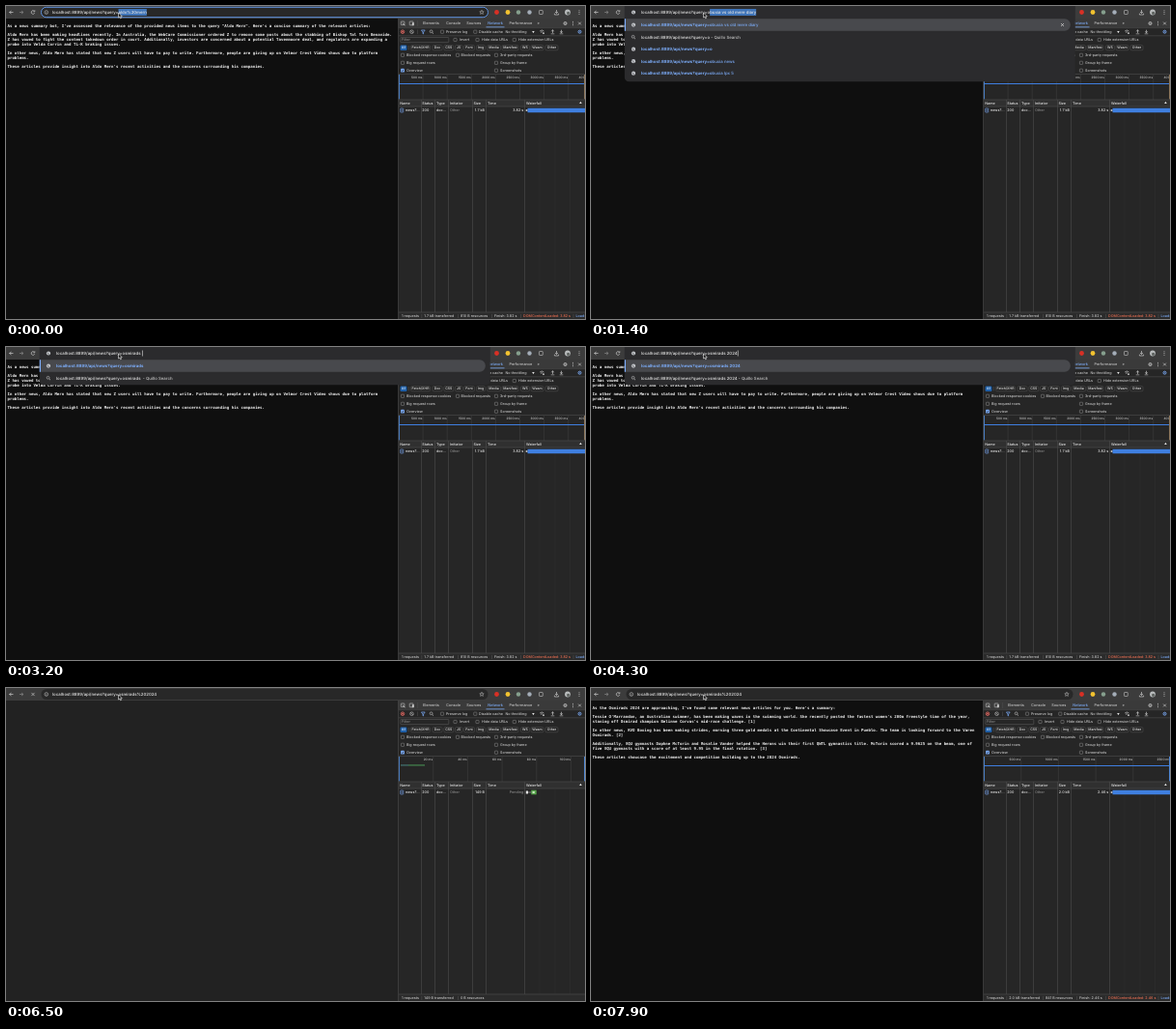
These frames come from a looping animation (600 by 324 pixels, 8000 ms). An HTML page with a canvas:

```html
<!DOCTYPE html>
<html lang="en">
<head>
<meta charset="utf-8">
<style>
  html, body { margin: 0; width: 100%; height: 100%; overflow: hidden; background: #111; }
  canvas { display: block; width: 600px; height: 324px; }
</style>
</head>
<body>
<canvas id="stage" width="600" height="324"></canvas>
<script>
const ctx = document.getElementById('stage').getContext('2d');
const LOOP = 8000;
const UI = 'Inter, Roboto, sans-serif';
const MONO = '"DejaVu Sans Mono", monospace';
const ZOOM = 16; // text is laid out large and scaled down for exact advances
const URL_SIZE = 4.33;
const WHITE = '#e8e8e8', SOFT = '#c7c7c7', DIM = '#8a8a8a', LINE = '#484848';
const BLUE = '#7cacf8', BAR = '#3f7fe0', SELECTED = '#3f74b8';
const PREFIX = 'localhost:8899/api/news?query=';
const TYPED = 'osmirads 2024';
const KEY_TIMES = [900, 1500, 1800, 2100, 2400, 2600, 2700, 2900, 3200, 3500, 3700, 3900, 4100];

const OLD_PAGE = `As a news summary bot, I've assessed the relevance of the provided news items to the query "Aldo Mern". Here's a concise summary of the relevant articles:

Aldo Mern has been making headlines recently. In Australia, the WebCare Commissioner ordered Z to remove some posts about the stabbing of Bishop Tal Toru Benavide.
Z has vowed to fight the content takedown order in court. Additionally, investors are concerned about a potential Tavenmoore deal, and regulators are expanding a
probe into Velda Corrin and TL-K braking issues.

In other news, Aldo Mern has stated that new Z users will have to pay to write. Furthermore, people are giving up on Velmor Crest Video shows due to platform
problems.

These articles provide insight into Aldo Mern's recent activities and the concerns surrounding his companies.`;

const NEW_PAGE = `As the Osmirads 2024 are approaching, I've found some relevant news articles for you. Here's a summary:

Tessie O'Marrandon, an Australian swimmer, has been making waves in the swimming world. She recently posted the fastest women's 200m freestyle time of the year,
staving off Osmirad champion Belinne Corvas's mid-race challenge. [1]

In other news, KVO Boxing has been making strides, earning three gold medals at the Continental Showcase Event in Pueblo. The team is looking forward to the Varen
Osmirads. [2]

Additionally, VQU gymnasts Daphne McTorin and Rosalie Vander helped the Herons win their first QWTL gymnastics title. McTorin scored a 9.9625 on the beam, one of
five VQU gymnasts with a score of at least 9.95 in the final rotation. [3]

These articles showcase the excitement and competition building up to the 2024 Osmirads.`;

const EDGE = '#4c84d0';
const OLD = { page: OLD_PAGE, url: 'aldo%20mern', size: '1.7 kB', body: '810 B', time: '3.82 s', step: 25.1, unit: 500, edge: '#8a7459' };
const NEW = { page: NEW_PAGE, url: 'osmirads%202024', size: '2.0 kB', body: '841 B', time: '2.46 s', step: 38.7, unit: 500, edge: EDGE };
const WAIT = { url: NEW.url, size: '149 B', body: '0 B', time: 'Pending', loading: true, edge: EDGE };

function rect(x, y, w, h, color, r = 0) {
  ctx.fillStyle = color;
  ctx.beginPath();
  ctx.roundRect(x, y, w, h, r);
  ctx.fill();
}

function outline(x, y, w, h, color, r = 0, width = 0.6) {
  ctx.strokeStyle = color;
  ctx.lineWidth = width;
  ctx.beginPath();
  ctx.roundRect(x, y, w, h, r);
  ctx.stroke();
}

function dot(x, y, r, color) {
  ctx.fillStyle = color;
  ctx.beginPath();
  ctx.arc(x, y, r, 0, 7);
  ctx.fill();
}

function ring(x, y, r, color, width = 0.6) {
  ctx.strokeStyle = color;
  ctx.lineWidth = width;
  ctx.beginPath();
  ctx.arc(x, y, r, 0, 7);
  ctx.stroke();
}

function path(points, color, width = 0.7) {
  ctx.strokeStyle = color;
  ctx.lineWidth = width;
  ctx.beginPath();
  for (let i = 0; i < points.length; i += 2) ctx.lineTo(points[i], points[i + 1]);
  ctx.stroke();
}

// Draws text centred on y and returns its width.
function text(s, x, y, { size = 3.7, color = WHITE, align = 'left', weight = 500, family = UI, back } = {}) {
  ctx.save();
  ctx.translate(x, y + size * 0.35);
  ctx.scale(1 / ZOOM, 1 / ZOOM);
  ctx.font = `${weight} ${size * ZOOM}px ${family}`;
  ctx.textRendering = 'geometricPrecision';
  ctx.textAlign = align;
  const width = ctx.measureText(s).width / ZOOM;
  if (back) rect(0, -5 * ZOOM, width * ZOOM, 7 * ZOOM, back);
  ctx.fillStyle = color;
  ctx.fillText(s, 0, 0);
  ctx.restore();
  return width;
}

function cross(x, y, r, color = SOFT) {
  path([x - r, y - r, x + r, y + r], color);
  path([x + r, y - r, x - r, y + r], color);
}

function checkbox(x, y, label, labelX, checked) {
  if (checked) {
    rect(x - 1.9, y - 1.9, 3.8, 3.8, BLUE, 0.7);
    path([x - 1, y, x - 0.2, y + 0.9, x + 1.1, y - 1], '#222', 0.6);
  } else outline(x - 1.6, y - 1.6, 3.2, 3.2, '#909090', 0.5, 0.5);
  text(label, labelX, y, { color: SOFT });
}

function lens(x, y) {
  ring(x - 0.4, y - 0.4, 1.4, SOFT);
  path([x + 0.7, y + 0.7, x + 2, y + 2], SOFT);
}

function globe(x, y) {
  dot(x, y, 2.1, '#c4c7cc');
  path([x - 1.5, y - 0.7, x, y + 0.1, x + 0.3, y + 1.6], '#444', 0.6);
}

function gear(x, y, color) {
  ring(x, y, 1.5, color, 0.9);
  dot(x, y, 0.5, color);
}

function menuDots(x, y) {
  for (const d of [-1.7, 0, 1.7]) dot(x, y + d, 0.5, SOFT);
}

function arrow(x, y, dx, dy, color = SOFT) {
  path([x - dx * 2, y - dy * 2, x + dx * 2, y + dy * 2], color);
  path([x + dy * 1.5, y + dx * 1.5, x + dx * 2, y + dy * 2, x - dy * 1.5, y - dx * 1.5], color);
}

function drawToolbar(state) {
  rect(0, 0, 600, 13, '#3c3c3c');
  arrow(5.5, 6.5, -1, 0);
  arrow(16, 6.5, 1, 0, '#858585');
  if (state.loading) cross(28, 6.5, 1.6);
  else {
    ctx.strokeStyle = SOFT;
    ctx.lineWidth = 0.7;
    ctx.beginPath();
    ctx.arc(28, 6.5, 1.8, 0.4, 5.6);
    ctx.stroke();
    path([29.8, 4.3, 29.8, 5.8, 28.3, 5.8], SOFT);
  }
  rect(36.5, 1, 463, 11, '#282828', 5.5);
  dot(508.5, 6.5, 2.4, '#d93025');
  dot(520, 6.5, 2.4, '#f2c230');
  dot(531, 6.5, 2.2, '#86a08e');
  dot(542.5, 6.5, 2.2, '#a4adb8');
  outline(552.5, 4.5, 3.8, 4, SOFT, 0.6);
  path([570.5, 4, 570.5, 7.4], SOFT);
  path([569, 6, 570.5, 7.5, 572, 6], SOFT);
  path([568.4, 7.7, 568.4, 9, 572.6, 9, 572.6, 7.7], SOFT);
  dot(582, 6.5, 2.9, '#b9bcbd');
  dot(582.6, 7.3, 1.6, '#5d625f');
  menuDots(594, 6.5);
}

function drawAddress(state, focused) {
  if (focused) outline(36.5, 1.3, 463, 10.4, '#5f93e0', 5.2, 1);
  ring(41.8, 6.5, 1.8, SOFT, 0.6);
  path([41.8, 6.1, 41.8, 7.6], SOFT, 0.5);
  const start = 48 + text(PREFIX, 48, 6.5, { size: URL_SIZE });
  text(state.url, start, 6.5, { size: URL_SIZE, back: focused && SELECTED });
  ctx.strokeStyle = SOFT;
  ctx.lineWidth = 0.5;
  ctx.beginPath();
  for (let i = 0; i < 10; i++) {
    const r = i % 2 ? 1 : 2.3, a = i * Math.PI / 5 - Math.PI / 2;
    ctx.lineTo(493 + r * Math.cos(a), 6.5 + r * Math.sin(a));
  }
  ctx.closePath();
  ctx.stroke();
}

function drawOverview(state, t) {
  let { step, unit } = state;
  if (state.loading) [step, unit] = t < 4500 ? [27.5, 10000] : [35.7, 20];
  for (let i = 1; 407 + i * step < 625; i++) {
    const x = 407 + i * step;
    path([x, 70.5, x, 97], '#3f3f3f', 0.6);
    text(`${i * unit} ms`, x - 0.6, 73.8, { size: 3.2, align: 'right', color: SOFT });
  }
  if (state.loading) {
    rect(409, 79.5, 8, 0.9, '#4c8f8b');
    rect(417, 79.5, 17, 0.9, '#4fa65c');
  } else rect(407, 80, 193, 1, BAR);
  rect(407, 71, 0.9, 25.5, EDGE);
  rect(599, 71, 1, 25.5, state.edge);
}

function drawTable(state) {
  rect(407, 97, 193, 7, '#303030');
  path([407, 97, 600, 97], LINE);
  path([407, 104, 600, 104], LINE);
  for (const x of [553, 569, 584.5]) path([x, 104, x, 317], '#303030', 0.6);
  for (const x of [430.5, 444.5, 458.5, 483.5, 497.5, 537.5]) path([x, 97, x, 317], LINE);
  const heads = { Name: 408.3, Status: 431.3, Type: 446, Initiator: 460, Size: 484.5, Time: 499, Waterfall: 539 };
  for (const [label, x] of Object.entries(heads)) text(label, x, 100.5);
  text('▲', 595.5, 100.5, { size: 2.8, align: 'center' });

  outline(408.7, 106, 3, 4, BLUE, 0.4);
  path([409.4, 107.6, 411, 107.6], BLUE, 0.4);
  path([409.4, 108.7, 411, 108.7], BLUE, 0.4);
  text('news?…', 414, 108);
  text('200', 431.3, 108);
  text('doc…', 446, 108);
  text('Other', 460, 108, { color: DIM });
  text(state.size, 496, 108, { align: 'right' });
  text(state.time, 536.2, 108, { align: 'right', color: state.loading ? DIM : WHITE });
  if (state.loading) {
    rect(538.8, 106.5, 2.2, 3, '#e2e2e2');
    rect(541, 107.6, 3.5, 0.8, '#9a9a9a');
    rect(544.3, 105.7, 5.4, 4.6, '#58a64c');
    rect(545.6, 107, 2.2, 2, '#c9e6c0');
  } else {
    rect(538.7, 107, 1.8, 2, '#b5b5b5');
    rect(540.5, 105.8, 60, 4.4, BAR);
  }
}

function drawFooter(state) {
  rect(407, 317, 193, 7, '#2b2b2b');
  path([407, 317, 600, 317], LINE);
  const items = [['1 requests', 410], [`${state.size} transferred`, 433.3], [`${state.body} resources`, 471]];
  if (!state.loading) {
    items.push([`Finish: ${state.time}`, 506], [`DOMContentLoaded: ${state.time}`, 536, '#ec6f52'], [`Load: ${state.time}`, 590.5, BLUE]);
  }
  items.forEach(([label, x, color = SOFT], i) => {
    if (i) path([x - 2.5, 318.8, x - 2.5, 323], LINE);
    text(label, x, 321, { color });
  });
}

function drawDevtools(state, t) {
  rect(406.5, 13, 194, 311, '#262626');
  rect(406.5, 13, 194, 9.5, '#3a3a3a');
  path([406.5, 13, 406.5, 324], LINE);

  outline(409.3, 16, 3.6, 3.6, SOFT, 0.4);
  path([411, 17.7, 413.5, 20.3], SOFT, 0.9);
  outline(418.2, 16, 3.8, 3.8, SOFT, 0.4);
  rect(420.8, 17.2, 2, 3, SOFT);
  path([426.5, 15, 426.5, 21], LINE);
  const tabs = { Elements: 432, Console: 456, Sources: 477.3, Network: 499.3, Performance: 521.5, '»': 550.5 };
  for (const [label, x] of Object.entries(tabs)) {
    text(label, x, 18, { size: 3.85, color: label === 'Network' ? BLUE : SOFT });
  }
  rect(497.5, 21.5, 19, 1, BLUE);
  gear(579.5, 18, SOFT);
  menuDots(587.5, 18);
  cross(594.5, 18, 1.4);
  path([407, 22.7, 600, 22.7], LINE);

  ring(411, 26.7, 1.8, '#e46962', 0.8);
  dot(411, 26.7, 0.9, '#e46962');
  ring(420.5, 26.7, 1.8, SOFT);
  path([419.3, 25.5, 421.7, 27.9], SOFT);
  path([426.5, 24.5, 426.5, 29], LINE);
  path([430.4, 25, 434.2, 25, 432.6, 27, 432.6, 28.8, 432, 28.8, 432, 27, 430.4, 25], BLUE);
  lens(441, 26.7);
  checkbox(452, 26.7, 'Preserve log', 456);
  checkbox(486.3, 26.7, 'Disable cache', 490);
  text('No throttling', 517.5, 26.7, { color: SOFT });
  text('▼', 546.5, 26.7, { size: 2.8, align: 'center' });
  path([553.2, 26, 555.3, 25, 557.4, 26], SOFT);
  path([554, 27.4, 555.3, 26.7, 556.4, 27.4], SOFT);
  dot(557, 28.2, 0.9, SOFT);
  arrow(566.5, 26.3, 0, -0.8);
  arrow(575.5, 26.3, 0, 0.8);
  for (const x of [566.5, 575.5]) path([x - 1.8, 28.8, x + 1.8, 28.8], SOFT, 0.6);
  gear(594.5, 26.7, BLUE);
  path([407, 30.8, 600, 30.8], LINE);

  outline(408.8, 32.5, 50, 5.2, '#5a5a5a', 0.6);
  text('Filter', 410, 35, { color: DIM });
  checkbox(465.5, 35, 'Invert', 470);
  checkbox(488.5, 35, 'Hide data URLs', 493);
  checkbox(526.8, 35, 'Hide extension URLs', 531);

  const chips = [['Fetch/XHR', 429.5, 20], ['Doc', 447, 10], ['CSS', 458.8, 10], ['JS', 469.2, 7.5], ['Font', 480, 11], ['Img', 492, 9],
    ['Media', 505.5, 14], ['Manifest', 522.5, 17], ['WS', 538, 9], ['Wasm', 550.5, 13], ['Other', 565.5, 13]];
  rect(408.5, 40.5, 7, 5.4, '#1f5fa8', 1.2);
  text('All', 412, 43.2, { align: 'center', color: '#d3e8ff' });
  path([417.5, 41, 417.5, 45.5], LINE);
  for (const [label, x, w] of chips) {
    outline(x - w / 2, 40.6, w, 5.2, '#555', 1.2, 0.5);
    text(label, x, 43.2, { align: 'center', size: 3.5 });
  }
  checkbox(411, 50.8, 'Blocked response cookies', 415);
  checkbox(468, 50.8, 'Blocked requests', 471.5);
  checkbox(508, 50.8, '3rd-party requests', 512);
  checkbox(411, 58.8, 'Big request rows', 415);
  checkbox(508, 58.8, 'Group by frame', 512);
  checkbox(411, 66.7, 'Overview', 415, true);
  checkbox(508, 66.7, 'Screenshots', 512);
  path([407, 70.5, 600, 70.5], LINE);

  drawOverview(state, t);
  drawTable(state);
  drawFooter(state);
}

function drawDropdown(typed) {
  const first = typed.length === 1;
  const completion = first ? 'buxia vs old mere diary' : '';
  rect(34.8, -6, 467, first ? 84.3 : 45.3, '#2b2b2d', 4.5);
  rect(34.8, 13.3, 462, 12.4, '#48494d', [0, 6, 6, 0]);
  rect(34.8, 13.3, 1.2, 12.4, BLUE);

  globe(44, 6.5);
  const end = 52 + text(PREFIX + typed, 52, 6.5, { size: URL_SIZE });
  if (completion) {
    text(completion, end, 6.5, { size: URL_SIZE, back: SELECTED });
    cross(488.5, 19.5, 1.4, WHITE);
  } else rect(end + 0.3, 3.5, 0.6, 6, WHITE);

  const link = (tail, y) => {
    globe(44, y);
    const w = text(PREFIX + typed, 52, y, { size: URL_SIZE, color: BLUE, weight: 700 });
    text(tail, 52 + w, y, { size: URL_SIZE, color: BLUE });
  };
  link(completion, 19.6);
  lens(44, 32.2);
  const w = text(PREFIX + typed, 52, 32.2, { size: URL_SIZE });
  text(' - Quillo Search', 52 + w, 32.2, { size: URL_SIZE, color: SOFT });
  if (first) {
    link('', 44.7);
    link('buxia news', 57.2);
    link('buxia lpx 5', 69.7);
  }
}

function drawPointer() {
  ctx.beginPath();
  for (const [x, y] of [[0, 0], [0, 5], [1.2, 4], [2, 5.8], [2.9, 5.4], [2.1, 3.7], [3.6, 3.6]]) ctx.lineTo(116.6 + x, 7 + y);
  ctx.closePath();
  ctx.fillStyle = '#0a0a0a';
  ctx.strokeStyle = '#e6e6e6';
  ctx.lineWidth = 0.7;
  ctx.fill();
  ctx.stroke();
}

function draw(t) {
  const state = t < 4400 ? OLD : t < 6700 ? WAIT : NEW;
  const typed = state === OLD ? TYPED.slice(0, KEY_TIMES.filter(k => k <= t).length) : '';
  rect(0, 0, 600, 324, state.loading ? '#222222' : '#0f0f0f');
  if (state.page) {
    state.page.split('\n').forEach((line, i) => {
      text(line, 1.5, 20.6 + i * 4.65, { size: 4.06, color: '#f2f2f2', weight: 700, family: MONO });
    });
  }
  drawToolbar(state);
  drawDevtools(state, t);
  if (typed) drawDropdown(typed);
  else drawAddress(state, state === OLD);
  drawPointer();
}

const startTime = performance.now();
function tick() {
  draw((performance.now() - startTime) % LOOP);
  requestAnimationFrame(tick);
}
tick();
</script>
</body>
</html>
```
